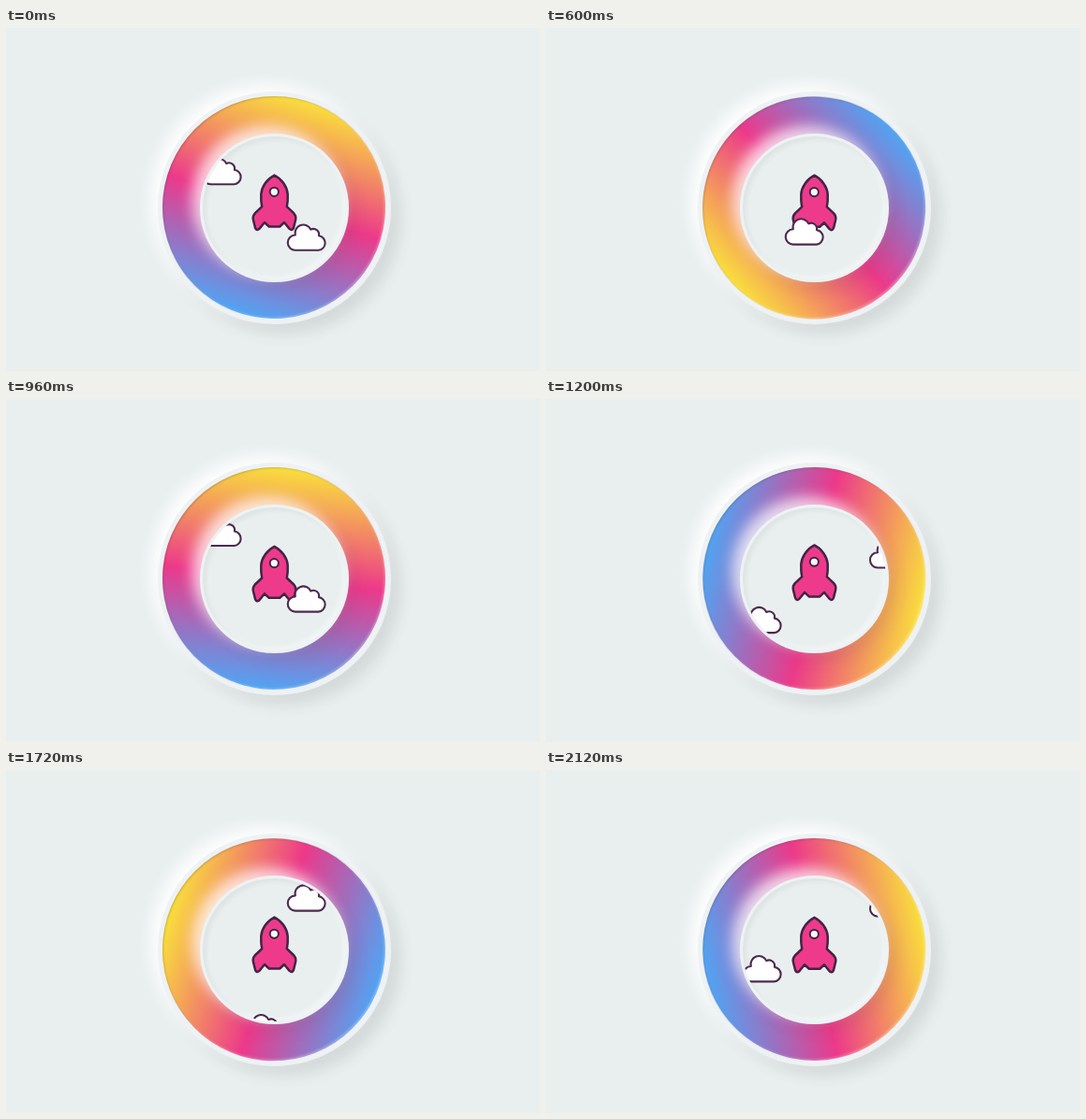
Animation, 570 px wide and 367 px high, one loop 2.16 s. Source, as an HTML page:

```html
<!DOCTYPE html>
<html lang="en">
<head>
<meta charset="utf-8">
<title>Rocket loader</title>
<style>
  html, body { margin: 0; width: 100%; height: 100%; overflow: hidden; background: #e9efef; }
  .disc {
    position: absolute; left: 286.5px; top: 192.5px; box-sizing: border-box;
    width: var(--size); height: var(--size); margin: calc(var(--size) / -2); border-radius: 50%;
  }
  .rim {
    --size: 249px; background: #eef2f4;
    box-shadow: -8px -8px 15px rgba(255, 255, 255, .9), 10px 10px 15px rgba(70, 70, 70, .13);
  }
  .ring { --size: 238.4px; background: linear-gradient(#f9df3c, #ec398a 50%, #50a4f3); }
  .edge {
    --size: 238.4px;
    box-shadow: inset 1px 1px 2px rgba(70, 70, 70, .25), inset -2px -2px 3px rgba(255, 255, 255, .35);
  }
  .hole {
    --size: 158.4px; background: #e9efef; border: 3px solid #eef2f4;
    box-shadow: -8px -8px 15px rgba(255, 255, 255, .75), 8px 8px 15px rgba(70, 70, 70, .1),
      inset 3px 3px 5px rgba(70, 70, 70, .07), inset -3px -3px 5px rgba(255, 255, 255, .4);
  }
  svg { position: absolute; left: 0; top: 0; }
</style>
</head>
<body>
<div class="disc rim"></div>
<div class="disc ring" id="ring"></div>
<div class="disc edge"></div>
<div class="disc hole"></div>
<svg width="570" height="367" viewBox="0 0 570 367">
  <defs>
    <clipPath id="window"><circle cx="286.5" cy="192.5" r="76.6"/></clipPath>
    <path id="cloud" d="M8.7-1A8.15 8.15 0 0 1 8.5-17.3A8.8 8.8 0 0 1 25-23.2A6 6 0 0 1 33.6-16.5A7.8 7.8 0 0 1 33.2-1Z"
      fill="#fff" stroke="#4c2a4e" stroke-width="2.1" stroke-linejoin="round"/>
  </defs>
  <g clip-path="url(#window)">
    <g id="rocket" stroke="#432444" stroke-width="2.5" stroke-linejoin="round">
      <path fill="#ee3a8b" d="M286.5 157.8C279 161.5 272.8 170 272.3 178C272 184 272.5 188 273.2 191.5
        L265.8 198.5Q263.2 201.5 263.8 205L266 214Q267.4 217.8 270.4 215.2L276 208.3L280.8 212.8
        H292.2L297 208.3L302.6 215.2Q305.6 217.8 307 214L309.2 205Q309.8 201.5 307.2 198.5
        L299.8 191.5C300.5 188 301 184 300.7 178C300.2 170 294 161.5 286.5 157.8Z"/>
      <circle cx="286.3" cy="175.6" r="4.6" fill="#f4f6f7" stroke-width="2"/>
    </g>
    <g id="clouds"></g>
  </g>
</svg>
<script>
  const LOOP = 2160, STEP = 40, TRAVEL = 350;
  // [time in ms, turns completed]
  const pace = [[0, 0], [280, .254], [600, .586], [960, .971], [1440, 1.503], [1720, 1.751], [2120, 2.169]];
  // [left, bottom at the start]
  const lanes = [[210.3, 168.2], [255.3, 27.5], [300.3, 238.8], [345.5, 98.5]];

  const byId = id => document.getElementById(id);
  const ring = byId('ring'), rocket = byId('rocket');
  const clouds = lanes.map(() => {
    const use = document.createElementNS('http://www.w3.org/2000/svg', 'use');
    use.setAttribute('href', '#cloud');
    return byId('clouds').appendChild(use);
  });

  function turnsAt(t) {
    const i = Math.max(1, pace.findIndex(p => p[0] >= t));
    const [t0, a] = pace[i - 1], [t1, b] = pace[i];
    return a + (b - a) * (t - t0) / (t1 - t0);
  }

  const moveTo = (el, x, y) => el.setAttribute('transform', `translate(${x} ${y})`);

  function draw(t) {
    const turns = turnsAt(t);
    ring.style.transform = `rotate(${17 + turns * 360}deg)`;
    moveTo(rocket, 0, -1 - Math.cos(2 * Math.PI * (turns - .075) / .2));
    lanes.forEach(([x, y], i) => moveTo(clouds[i], x, (y + turns * TRAVEL) % TRAVEL));
  }

  const start = performance.now();
  function tick() {
    const t = (performance.now() - start) % LOOP;
    draw(Math.floor(t / STEP) * STEP);
    requestAnimationFrame(tick);
  }
  tick();
</script>
</body>
</html>
```
